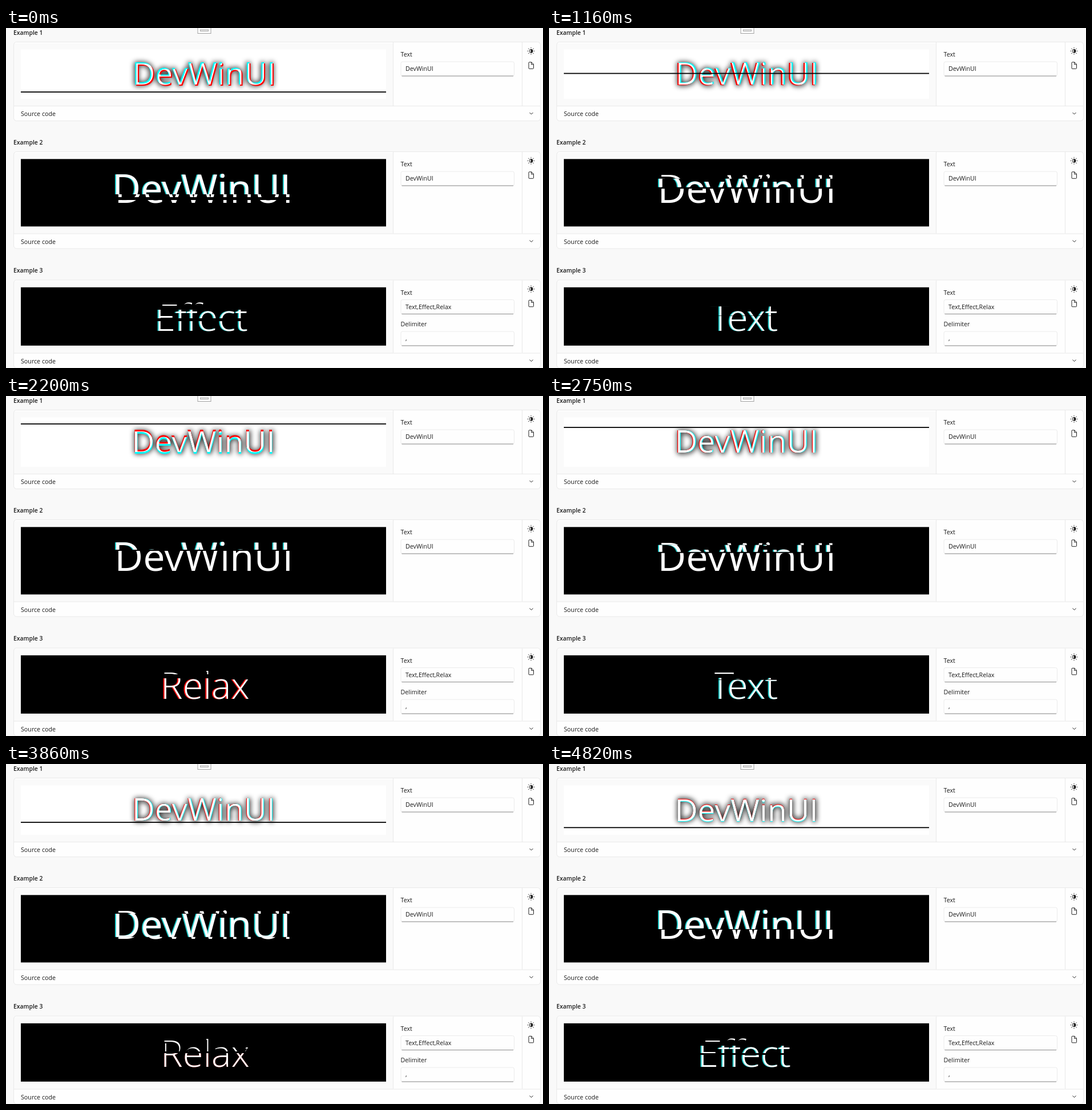
These frames come from a looping animation (941x595 px, 4890 ms). An HTML page with a canvas:

```html
<!DOCTYPE html>
<html lang="en">
<head>
<meta charset="utf-8">
<title>Glitch text examples</title>
<style>
  html, body { margin: 0; width: 100%; height: 100%; overflow: hidden; background: #f9f9f9; }
  svg, canvas { position: absolute; left: 0; top: 0; }
  svg { font: 10.7px "Open Sans", "Noto Sans", sans-serif; fill: #1b1b1b; }
  .title { font-size: 10.4px; font-weight: 600; }
  .edge { fill: none; stroke: #e9e9e9; }
  .icon { fill: none; stroke: #222; }
  .big { font-size: 55px; fill: #000; stroke: #000; stroke-width: 2; filter: blur(5px); }
</style>
</head>
<body>
<svg id="page" width="941" height="595"></svg>
<canvas id="stage" width="941" height="595"></canvas>
<script>
const LOOP = 4890, FRAME = 68.87;
const FAMILY = '"Open Sans", "Noto Sans", sans-serif';
const NAME = 'DevWinUI';

// Static page
const label = (x, y, text, cls = '') => `<text x="${x}" y="${y}" class="${cls}">${text}</text>`;
const rect = (x, y, w, h, fill, more = '') =>
  `<rect x="${x}" y="${y}" width="${w}" height="${h}" fill="${fill}" ${more}/>`;

const field = (y, name, value) => `
  ${label(691.5, y, name)}
  ${rect(692, y + 9, 198.5, 25, '#fefefe', 'rx="3" stroke="#ebebeb"')}
  <path d="M693.5 ${y + 34}h195.5" stroke="#8c8c8c"/>
  ${label(700, y + 25, value)}`;

const icons = y => {
  let rays = '';
  for (let i = 0; i < 8; i++) rays += `<path d="M0 -5v-1.4" transform="rotate(${i * 45})"/>`;
  return `<g class="icon" transform="translate(920 ${y})">${rays}
    <circle r="3"/><path d="M0 -3a3 3 0 0 1 0 6z" fill="#222"/>
    <path d="M-4 20.5q0 -1 1 -1h3.8l3.7 3.7v6.8q0 1 -1 1h-6.5q-1 0 -1 -1zM.6 19.5v4h4"/></g>`;
};

const card = (index, y, h, panelH, panelFill, fields) => {
  const foot = y + h - 26;
  return `
  ${label(13, y - 12.3, 'Example ' + index, 'title')}
  ${rect(13.5, y + .5, 923, h, '#fefefe', 'rx="5"')}
  ${rect(14, y + 3, 664, h - 29, '#fafafa')}
  ${rect(26, y + 13.3, 640, panelH, panelFill)}
  <path class="edge" d="M14 ${foot + .5}h922M678.5 ${y + 1}V${foot}M904.5 ${y + 1}V${foot}"/>
  ${rect(13.5, y + .5, 923, h, 'none', 'rx="5" stroke="#e9e9e9"')}
  ${fields}${icons(y + 16.3)}
  ${label(26, foot + 18, 'Source code')}
  <path class="icon" d="M917.5 ${foot + 12}l3 3l3 -3"/>`;
};

document.getElementById('page').innerHTML =
  rect(336, -5, 23, 14.5, '#fdfdfd', 'stroke="#a3a3a3"') +
  rect(340.5, 3, 14, 2.5, '#eee', 'stroke="#aaa"') +
  card(1, 24, 138, 86.5, '#fff', field(50, 'Text', NAME)) +
  card(2, 216, 169.5, 118, '#000', field(242, 'Text', NAME)) +
  card(3, 440.5, 154, 102, '#000',
    field(466.5, 'Text', 'Text,Effect,Relax') + field(522, 'Delimiter', ',')) +
  label(221, 99.5, NAME, 'big');

// Motion tracks: one value per entry of the matching time list
const TIMES = [0, 760, 1580, 2200, 3240, 3860, 4820];
const LINE_TIMES = [0, 760, 1580, 1945, 2200, 3240, 3860, 4820];
const LINE = [112, 98.7, 52.7, 39.5, 48.8, 60.3, 102.3, 111.3];
const TRACKS = {
  redX: [2, -2, -.5, -1, -2, -1, -.5],
  redY: [1.5, .5, 1, -2, 1.5, -1, 0],
  cyanX: [0, 2, -1, -.5, 0, 0, -.5],
  cyanY: [-.5, 0, -2, 1.5, -1.5, 0, 1.5],
  bandTop: [250, 250, 283, 250, 270, 262, 250],
  bandEnd: [291, 271, 289, 269, 276, 303, 289],
  baseTop: [291, 275, 290, 271, 278, 303, 290],
  notch: [5, 0, 0, 0, 0, 0, 0],
  thinEnd: [486, 487, 478, 487, 486, 503, 486],
  bodyTop: [493, 494, 478, 494, 493, 506, 493],
  slitTop: [508, 494, 516, 494, 498, 506, 506],
  slitH: [5, 0, 1.5, 0, 1.5, 0, 3],
  fringe: [-2, -2, -2, -2, -2, 0, -2]
};

const at = (times, values, t) => {
  let i = 1;
  while (i < times.length - 1 && times[i] < t) i++;
  const k = Math.min(1, (t - times[i - 1]) / (times[i] - times[i - 1]));
  return values[i - 1] + (values[i] - values[i - 1]) * k;
};

const ctx = document.getElementById('stage').getContext('2d');

function say(text, x, y, color) {
  ctx.fillStyle = color;
  ctx.fillText(text, x, y);
}

function band(top, end, paint) {
  if (end <= top) return;
  ctx.save();
  ctx.beginPath();
  ctx.rect(26, top, 640, end - top);
  ctx.clip();
  paint();
  ctx.restore();
}

function bar(y, h) {
  ctx.fillStyle = '#000';
  ctx.fillRect(26, y, 640, h);
}

function splitColors(p, lineY) {
  ctx.font = `55px ${FAMILY}`;
  ctx.globalCompositeOperation = 'lighter';
  say(NAME, 221 + p.redX, 99.5 + p.redY, '#f00');
  say(NAME, 221 + p.cyanX, 99.5 + p.cyanY, '#0ff');
  ctx.globalCompositeOperation = 'source-over';
  bar(lineY - .9, 1.8);
}

function slicedName(p) {
  const x = 190.3, y = 305.5;
  ctx.font = `68.5px ${FAMILY}`;
  band(250, p.bandTop, () => {
    say(NAME, x, y, '#fff');
    say(NAME, x - 3.5, y + 3, '#000');
  });
  band(p.bandTop, p.bandEnd, () => {
    say(NAME, x - 6, y - 1, '#2cc');
    say(NAME, x - 4, y - 1, '#fff');
  });
  band(p.baseTop, 312, () => say(NAME, x, y, '#fff'));
  bar(296, p.notch);
}

function wordCycle(p, t) {
  const phase = (t + 150) % 1605;
  const word = ['Effect', 'Relax', 'Text'][Math.floor(phase / 535)];
  const cold = word === 'Text' || (word === 'Effect' && phase > 140);
  const x = 349, y = 529.5, shift = cold ? -6.5 : 0;
  ctx.font = `300 65px ${FAMILY}`;
  ctx.textAlign = 'center';
  band(476, p.thinEnd, () => {
    say(word, x, y, '#fff');
    say(word, x - 2, y + 2.5, '#000');
  });
  band(p.bodyTop, 535, () => {
    say(word, x + shift + p.fringe, y, cold ? '#2cc' : '#f00');
    say(word, x + shift, y, '#fff');
  });
  bar(p.slitTop, p.slitH);
  ctx.textAlign = 'start';
}

function draw() {
  const t = Math.floor(performance.now() % LOOP / FRAME + .1) * FRAME;
  const pose = {};
  for (const key in TRACKS) pose[key] = at(TIMES, TRACKS[key], t);
  ctx.clearRect(0, 0, 941, 595);
  splitColors(pose, at(LINE_TIMES, LINE, t));
  slicedName(pose);
  wordCycle(pose, t);
  requestAnimationFrame(draw);
}
draw();
</script>
</body>
</html>
```
